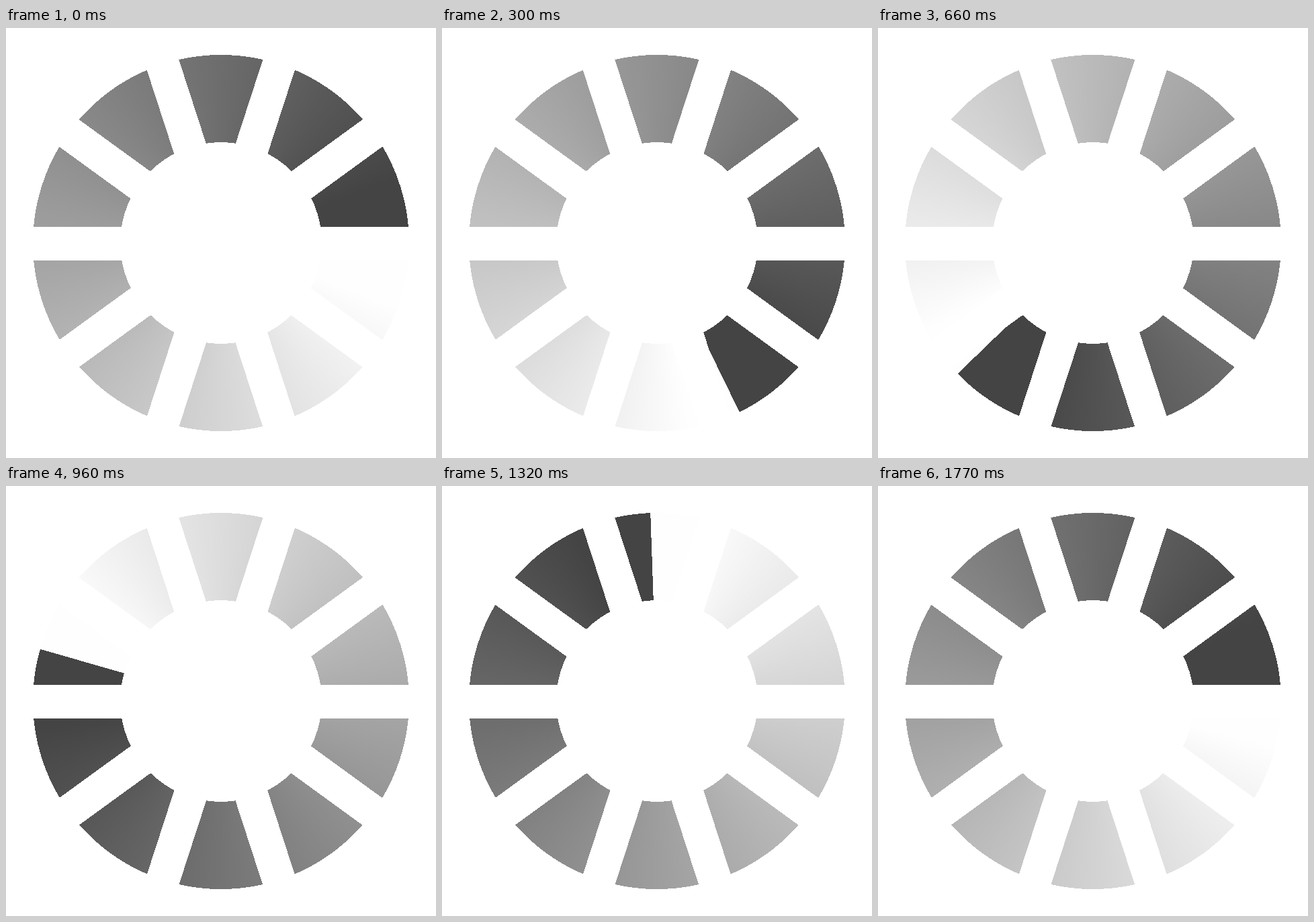
An HTML page for the animation above (1800 ms loop, 640 by 640 pixels).

```html
<!DOCTYPE html>
<html lang="en">
<head>
<meta charset="utf-8">
<title>Spinner</title>
<style>
  html, body { margin: 0; width: 100%; height: 100%; overflow: hidden; background: #fff; }
  #wheel, svg { position: absolute; left: 0; top: 0; width: 640px; height: 640px; }
  #wheel { background: conic-gradient(from var(--turn, 94deg), #fefefe 16deg, #444 336deg); }
</style>
</head>
<body>
<div id="wheel"></div>
<!-- White cover that leaves ten segments open -->
<svg viewBox="0 0 640 640" shape-rendering="crispEdges" fill="none" stroke="#fff">
  <circle cx="320" cy="320" r="400" stroke-width="240"/>
  <circle cx="320" cy="320" r="150" fill="#fff" stroke="none"/>
  <g id="gaps" stroke-width="50"></g>
</svg>
<script>
  const LOOP = 1800, STEP = 30;
  const wheel = document.getElementById('wheel');

  document.getElementById('gaps').innerHTML = [0, 36, 72, 108, 144]
    .map(a => `<path d="M0 320.7H640" transform="rotate(${a} 320 320.5)"/>`)
    .join('');

  function draw(now) {
    const t = Math.floor(now % LOOP / STEP) * STEP;
    wheel.style.setProperty('--turn', 94 + 360 * t / LOOP + 'deg');
    requestAnimationFrame(draw);
  }
  draw(performance.now());
</script>
</body>
</html>
```
